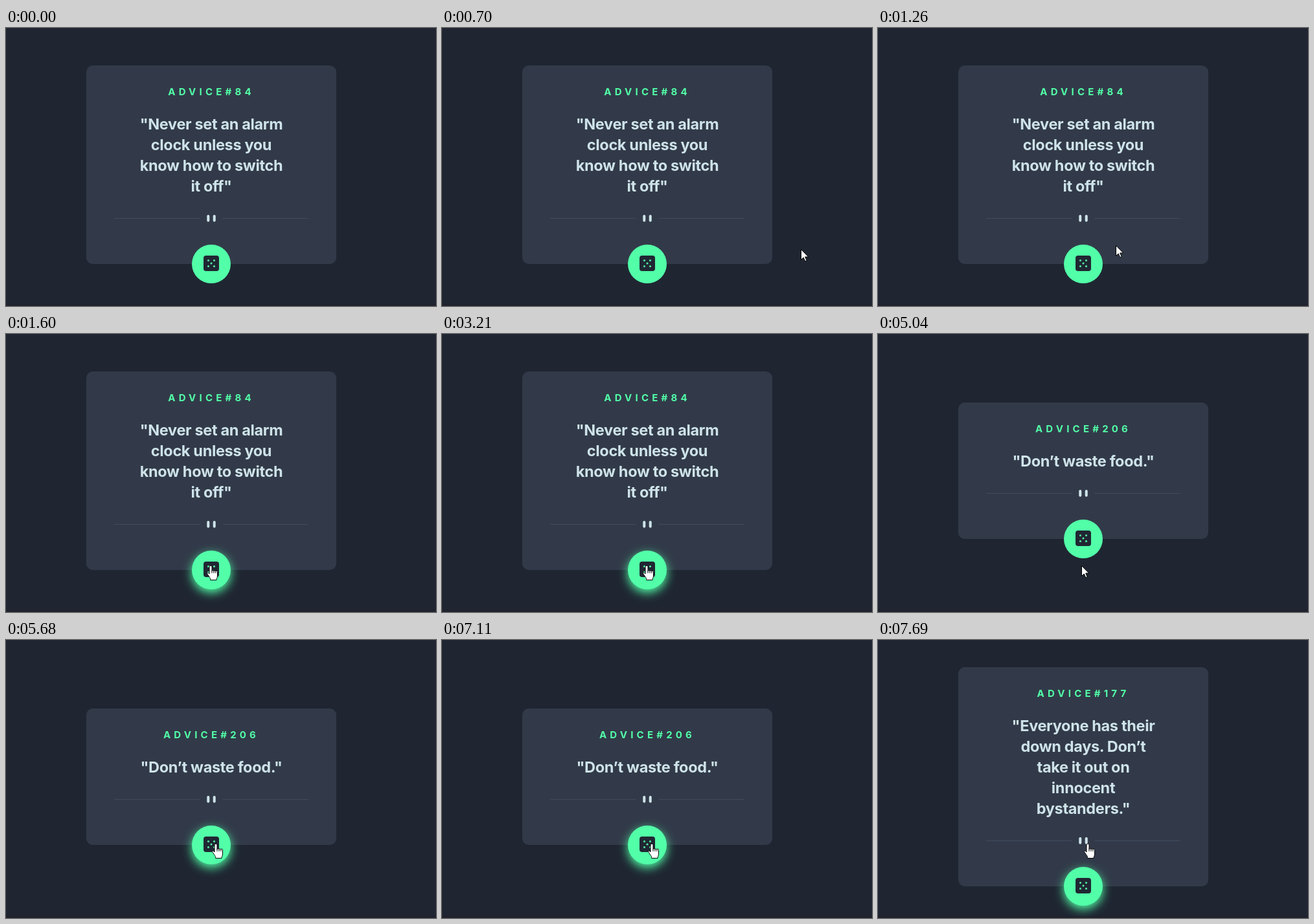
Recreate the animation shown at these times as an HTML page. Size 664x430 px, loop 8000 ms.

```html
<!DOCTYPE html>
<html lang="en">
<head>
<meta charset="utf-8">
<title>Advice generator</title>
<style>
  html, body { margin: 0; width: 100%; height: 100%; overflow: hidden; background: #1f2632; }
  #stage { position: relative; width: 664px; height: 430px; overflow: hidden; font-family: Inter, "Open Sans", sans-serif; text-align: center; }
  #stage * { position: absolute; }
  #strip { left: 0; top: 426px; width: 664px; height: 4px; background: #20232d; }
  #card { left: 124px; width: 386px; border-radius: 10px; background: #323a49; }
  #title { top: 31px; width: 100%; font-size: 15px; line-height: 20px; font-weight: 700; letter-spacing: 5.2px; color: #52ffa8; }
  #quote { top: 75px; width: 100%; font-size: 23.5px; line-height: 32px; font-weight: 700; letter-spacing: -.35px; color: #cee3e9; white-space: pre; }
  #divider { left: 43px; bottom: 65px; width: 300px; height: 10.8px; }
  #button { left: 163px; bottom: -30px; width: 60px; height: 60px; border-radius: 50%; background: #52ffa8; }
  #button.over { box-shadow: 0 5px 15px #52ffa8; }
  #dice { left: 18px; top: 17px; }
  #click { width: 24px; height: 24px; margin: -12px; border-radius: 50%; background: rgba(255, 255, 0, .47); }
  #cursor { left: 0; top: 0; }
</style>
</head>
<body>
<div id="stage">
  <div id="strip"></div>
  <div id="card">
    <div id="title"></div>
    <div id="quote"></div>
    <svg id="divider" viewBox="0 0 444 16">
      <path fill="#4f5d74" d="M0 8h196v1H0zM248 8h196v1H248z"/>
      <g fill="#cee3e9"><rect x="212" width="6" height="16" rx="3"/><rect x="226" width="6" height="16" rx="3"/></g>
    </svg>
    <div id="button">
      <svg id="dice" width="24" height="24">
        <rect width="24" height="24" rx="4" fill="#202733"/>
        <path stroke="#52ffa8" stroke-width="3" stroke-linecap="round" d="M7.5 7.5h0M16.5 7.5h0M12 12h0M7.5 16.5h0M16.5 16.5h0"/>
      </svg>
    </div>
  </div>
  <svg id="cursor" width="664" height="430">
    <g id="pointer" fill="#fff" stroke="#000" stroke-linejoin="round">
      <path id="arrow" d="M.5.5V16.5L4.2 13 6.8 18.7 9.2 17.7 6.7 12H11.7Z"/>
      <g id="hand" transform="translate(-4)">
        <path d="M5.5.5c-1 0-1.5.7-1.5 1.5v11l-1.5-1.5c-.8-.8-2-.5-1.9.7 0 .8 2.4 4 4 6.3 1 1.5 1 2 1 4H15c0-2.5 1.5-3.5 1.5-6.5V9.5c0-1.8-2.6-1.8-2.6 0 0-2-2.9-2-2.9-.3 0-2-3-2-3-.3V2c0-.8-.6-1.5-1.5-1.5z"/>
        <path fill="none" d="M8 8.5V12M11 9V12M13.9 9.5V12"/>
      </g>
    </g>
  </svg>
  <div id="click"></div>
</div>
<script>
const LOOP = 8000;
const el = id => document.getElementById(id);
const show = (id, on) => el(id).style.display = on ? "" : "none";

const scenes = [
  { from: 0, number: 84, lines: ['"Never set an alarm', 'clock unless you', 'know how to switch', 'it off"'] },
  { from: 3770, number: 206, lines: ['"Don’t waste food."'] },
  { from: 7690, number: 177, lines: ['"Everyone has their', 'down days. Don’t', 'take it out on', 'innocent', 'bystanders."'] }
];

// Pointer path: time, x, y
const path = [
  [500, 616, 425], [700, 554, 342], [960, 461, 321], [1260, 367, 336],
  [1300, 361, 338], [1420, 338, 348], [1600, 314, 358],
  [5020, 314, 358], [5040, 314, 358], [5440, 318, 344], [5680, 322, 315]
];

function pointerAt(t) {
  const i = path.findIndex(p => p[0] > t);
  if (i < 0) return path[path.length - 1].slice(1);
  if (i === 0) return path[0].slice(1);
  const a = path[i - 1], b = path[i], k = (t - a[0]) / (b[0] - a[0]);
  return [1, 2].map(n => Math.round(a[n] + (b[n] - a[n]) * k));
}

let current;
function setScene(scene) {
  if (scene === current) return;
  current = scene;
  const height = 179 + 32 * scene.lines.length;
  el("card").style.height = height + "px";
  el("card").style.top = Math.floor(211.5 - height / 2) + "px";
  el("title").textContent = "ADVICE#" + scene.number;
  el("quote").textContent = scene.lines.join("\n");
}

function draw(t) {
  setScene(scenes.filter(s => s.from <= t).pop());
  // Hover only updates when the pointer moves, so it outlasts a card change.
  const over = t >= 1420 && t < 5040 || t >= 5440;
  const clicked = t >= 3070 && t < 3210 || t >= 6950 && t < 7110;
  const [x, y] = pointerAt(t);
  el("button").className = over ? "over" : "";
  el("pointer").setAttribute("transform", `translate(${x} ${y})`);
  show("cursor", t >= 500);
  show("arrow", !over);
  show("hand", over);
  show("click", clicked);
  el("click").style.left = x + "px";
  el("click").style.top = y + "px";
}

const start = performance.now();
function tick() {
  draw((performance.now() - start) % LOOP);
  requestAnimationFrame(tick);
}
tick();
</script>
</body>
</html>
```
